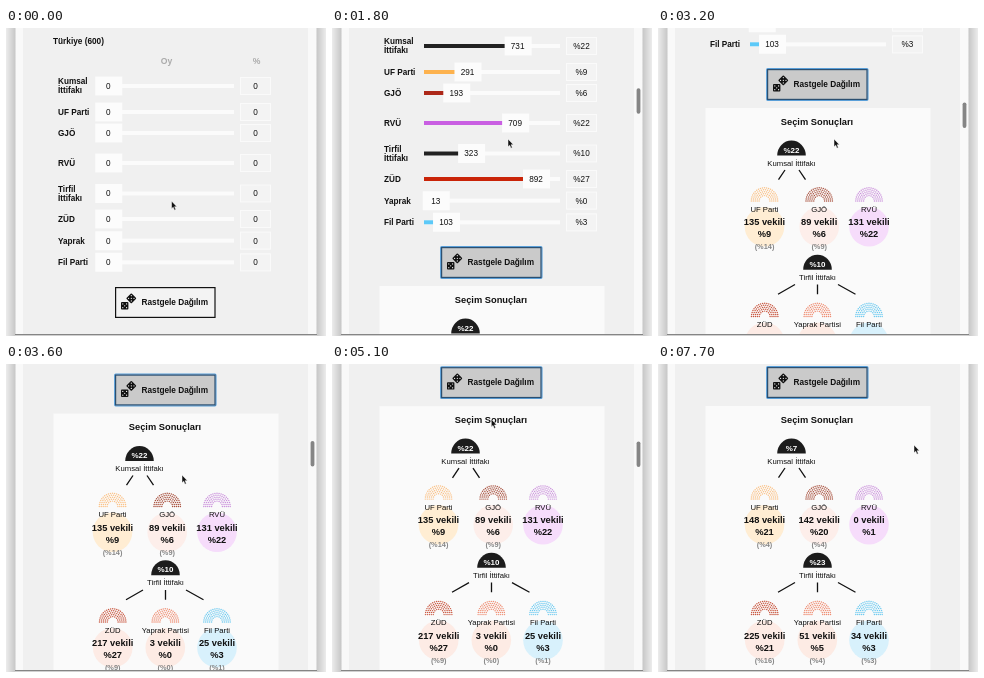
These frames come from a looping animation (320x308 px, 8 s). An HTML page:

```html
<!DOCTYPE html>
<html lang="tr">
<head>
<meta charset="utf-8">
<title>Rastgele Dağılım</title>
<style>
  html, body { margin: 0; width: 100%; height: 100%; overflow: hidden; background: #f0f0f0; }
  svg { display: block; width: 100vw; height: 100vh; }
  text { font-family: "Liberation Sans", Arial, sans-serif; fill: #111; }
</style>
</head>
<body>
<svg id="stage" viewBox="0 0 320 308">
  <defs>
    <linearGradient id="edge">
      <stop offset="0" stop-color="#ececec"/>
      <stop offset="1" stop-color="#c6c6c6"/>
    </linearGradient>
  </defs>
  <rect width="320" height="308" fill="#f9f9f9"/>
  <rect x="17" width="285" height="308" fill="#f0f0f0"/>
  <g id="page"></g>
  <rect width="9.5" height="308" fill="url(#edge)"/>
  <rect width="9.5" height="308" fill="url(#edge)" transform="translate(320) scale(-1 1)"/>
  <rect y="306" x="9" width="302" height="1" fill="#858585"/>
  <rect y="307" x="9" width="302" height="1" fill="#d0d0d0"/>
  <rect id="thumb" x="304.6" width="3.8" height="25.5" rx="1.9" fill="#858585"/>
  <path id="arrow" d="M0 0V7.8L1.7 6.2L3 9.2L4.3 8.6L3.1 5.7H5.4Z" fill="#111" stroke="#fff" stroke-width=".5"/>
  <path id="hand" d="M1.2 1.2Q2.1 .2 2.9 1.2V4.2L6.6 5Q7.5 5.3 7.3 6.6L6.6 9.6H2.6L-.4 6.5Q-.4 5.2 1.2 6Z" fill="#fff" stroke="#222" stroke-width=".7" stroke-linejoin="round"/>
</svg>
<script>
const LOOP = 8000, STEP = 100;
const $ = id => document.getElementById(id);
const page = $("page");

function add(tag, attrs, parent = page) {
  const el = document.createElementNS("http://www.w3.org/2000/svg", tag);
  for (const k in attrs) el.setAttribute(k, attrs[k]);
  return parent.appendChild(el);
}

function rect(x, y, width, height, fill, parent) {
  return add("rect", { x, y, width, height, fill }, parent);
}

// y is the vertical middle of the line
function label(str, x, y, size, { bold, fill, anchor = "middle", parent } = {}) {
  const el = add("text", { x, y: y + size * 0.355, "font-size": size, "text-anchor": anchor }, parent);
  if (bold) el.setAttribute("font-weight", 700);
  if (fill) el.style.fill = fill;
  el.textContent = str;
  return el;
}

const clamp = v => Math.max(0, Math.min(1, v));
const mix = (a, b, p) => a + (b - a) * p;

// Linear interpolation through [time, value] points
function along(points, t) {
  let prev = points[0];
  for (const next of points) {
    if (t <= next[0]) return mix(prev[1], next[1], clamp((t - prev[0]) / (next[0] - prev[0] || 1)));
    prev = next;
  }
  return prev[1];
}

// ---- form ----
label("Türkiye (600)", 47, 13, 8.25, { bold: true, anchor: "start" });
label("Oy", 160.5, 33, 8.6, { bold: true, fill: "#aaa" });
label("%", 250.5, 33, 8.6, { bold: true, fill: "#aaa" });

const rows = [
  ["Kumsal İttifakı", 58, "#222", 731, 22],
  ["UF Parti", 84, "#fdb24e", 291, 9],
  ["GJÖ", 105, "#ad2819", 193, 6],
  ["RVÜ", 135, "#c95fe2", 709, 22],
  ["Tirfil İttifakı", 165.5, "#222", 323, 10],
  ["ZÜD", 191, "#c92408", 892, 27],
  ["Yaprak", 212.7, "#d9532c", 13, 0],
  ["Fil Parti", 234.3, "#5cc9f8", 103, 3],
].map(([name, y, color, votes, share]) => {
  const lines = name.endsWith("İttifakı") ? name.split(" ") : [name];
  lines.forEach((s, i) =>
    label(s, 52, y + (lines.length > 1 ? i * 9 - 4.7 : 0), 8.2, { bold: true, anchor: "start" }));
  rect(92, y - 2, 136, 4, "#fbfbfb");
  const bar = rect(92, y - 2, 0, 4, color);
  const knob = add("g", {});
  rect(-13, y - 9.5, 27, 19, "#fcfcfc", knob);
  const value = label("0", 0, y, 8.2, { parent: knob });
  add("rect", { x: 234.5, y: y - 8.5, width: 30, height: 17, fill: "#f3f3f3", stroke: "#fafafa" });
  return { bar, knob, value, pct: label("0", 249.5, y, 8.2), votes, share };
});

// ---- button ----
const ring = add("rect", { x: 108.7, y: 258.7, width: 101.2, height: 31.6, rx: 1, fill: "none", stroke: "#5a9fd8", "stroke-width": 1.3 });
const face = add("rect", { x: 109.6, y: 259.6, width: 99.4, height: 29.8, "stroke-width": 1.2 });
label("Rastgele Dağılım", 135.5, 274.2, 8.25, { bold: true, anchor: "start" });

function die(x, y, turn) {
  const g = add("g", { transform: `translate(${x} ${y}) rotate(${turn})` });
  add("rect", { x: -3.7, y: -3.7, width: 7.4, height: 7.4, rx: 0.9, fill: "#111" }, g);
  for (const [cx, cy] of [[0, 0], [-1.9, -1.9], [1.9, -1.9], [-1.9, 1.9], [1.9, 1.9]])
    add("circle", { cx, cy, r: 0.6, fill: "#fff" }, g);
}
die(125.3, 270.3, 45);
die(118.7, 277.8, 0);

// ---- results ----
const results = add("g", {});
rect(47.5, 298, 225, 300, "#fafafa", results);
label("Seçim Sonuçları", 159, 311.5, 9.3, { bold: true, parent: results });

// Each number is a pair: before and after the second draw
const counters = [];
function counter(from, to, wrap, ...pos) {
  const el = label("", ...pos);
  counters.push({ el, from, to, wrap });
}
const pct = n => "%" + n;

function alliance(name, x, base, [from, to], legs) {
  add("path", { d: `M${x - 14.3} ${base}a14.3 15 0 0 1 28.6 0z`, fill: "#1c1c1c" }, results);
  counter(from, to, pct, x, base - 5.8, 8, { bold: true, fill: "#fff", parent: results });
  label(name, x, base + 7.3, 7.7, { parent: results });
  add("path", { d: legs, stroke: "#111", "stroke-width": 1.3 }, results);
}

function party(name, x, top, color, tint, seats, share, boost) {
  add("circle", { cx: x, cy: top + 39.7, r: 19.8, fill: tint }, results);
  for (let row = 0; row < 5; row++) {
    const r = 5.4 + row * 1.95, n = 9 + row * 3;
    for (let i = 0; i < n; i++) {
      const a = Math.PI * i / (n - 1);
      add("circle", { cx: x - r * Math.cos(a), cy: top + 14 - r * Math.sin(a), r: 0.72, fill: color }, results);
    }
  }
  const strong = { bold: true, parent: results };
  label(name, x, top + 22, 7.7, { parent: results });
  counter(...seats, n => n + " vekili", x, top + 34.7, 9.3, strong);
  counter(...share, pct, x, top + 46.8, 9.3, strong);
  if (boost) counter(...boost, n => `(%${n})`, x, top + 59.5, 7.4, { bold: true, fill: "#858585", parent: results });
}

alliance("Kumsal İttifakı", 133.5, 345.5, [22, 7], "M127 360l-6.5 9.7M141 360l6.5 9.7");
party("UF Parti", 106.5, 377, "#fbc287", "#ffedd3", [135, 148], [9, 21], [14, 4]);
party("GJÖ", 161.2, 377, "#a8503d", "#fdeeea", [89, 142], [6, 20], [9, 4]);
party("RVÜ", 211, 377, "#cb92dc", "#f6dcfb", [131, 0], [22, 1]);
alliance("Tirfil İttifakı", 159.5, 459.7, [10, 23], "M137 474.5l-17 9.7M159.5 474.5v9.7M180 474.5l17.5 9.7");
party("ZÜD", 106.7, 492.5, "#c9563f", "#fdebe5", [217, 225], [27, 21], [9, 16]);
party("Yaprak Partisi", 159.3, 492.5, "#ef8d72", "#fdebe4", [3, 51], [0, 5], [0, 4]);
party("Fil Parti", 211, 492.5, "#6ccaf0", "#d8f1fc", [25, 34], [3, 3], [1, 3]);

// ---- motion ----
const scrollPath = [[1400, 0], [1800, 40], [2600, 113], [3200, 218], [3600, 248.5], [4100, 255], [4600, 255.4], [5200, 256]];
const pointerX = [[0, 165.5], [500, 150], [1400, 150], [1700, 176], [4600, 176], [5400, 149.3], [7500, 149.3], [7600, 215], [7700, 256]];
const pointerY = [[0, 173], [500, 270], [1400, 270], [1700, 111], [4600, 111], [5400, 21.8], [7500, 21.8], [7600, 55], [7700, 81]];
const thumbFade = [[1400, 0], [1600, 1], [5600, 1], [5900, 0.22], [6100, 0]];

function draw(t) {
  const scroll = along(scrollPath, t);
  page.setAttribute("transform", `translate(0 ${-scroll})`);
  $("thumb").setAttribute("y", 57 + scroll * 0.08);
  $("thumb").setAttribute("opacity", along(thumbFade, t));

  const x = along(pointerX, t), y = along(pointerY, t), docY = y + scroll;
  const over = x > 109 && x < 210 && docY > 259 && docY < 290;
  const clicked = t >= 800;
  for (const [id, on] of [["arrow", !over], ["hand", over]]) {
    $(id).setAttribute("transform", `translate(${x} ${y})`);
    $(id).style.display = on ? "" : "none";
  }
  face.setAttribute("fill", over || clicked ? "#cacaca" : "#f3f3f3");
  face.setAttribute("stroke", clicked ? "#2c4f70" : "#111");
  ring.style.display = results.style.display = clicked ? "" : "none";

  const first = clamp((t - 700) / 500);
  for (const r of rows) {
    const votes = Math.round(r.votes * first), mid = 102.3 + votes * 0.114;
    r.bar.setAttribute("width", Math.max(0, mid - 104));
    r.knob.setAttribute("transform", `translate(${mid} 0)`);
    r.value.textContent = votes;
    r.pct.textContent = clicked ? pct(Math.round(r.share * first)) : "0";
  }

  const second = clamp((t - 6900) / 500);
  for (const c of counters) c.el.textContent = c.wrap(Math.round(mix(c.from, c.to, second)));
}

const start = performance.now();
function tick() {
  const t = (performance.now() - start) % LOOP;
  draw(Math.floor(t / STEP) * STEP);
  requestAnimationFrame(tick);
}
tick();
</script>
</body>
</html>
```
